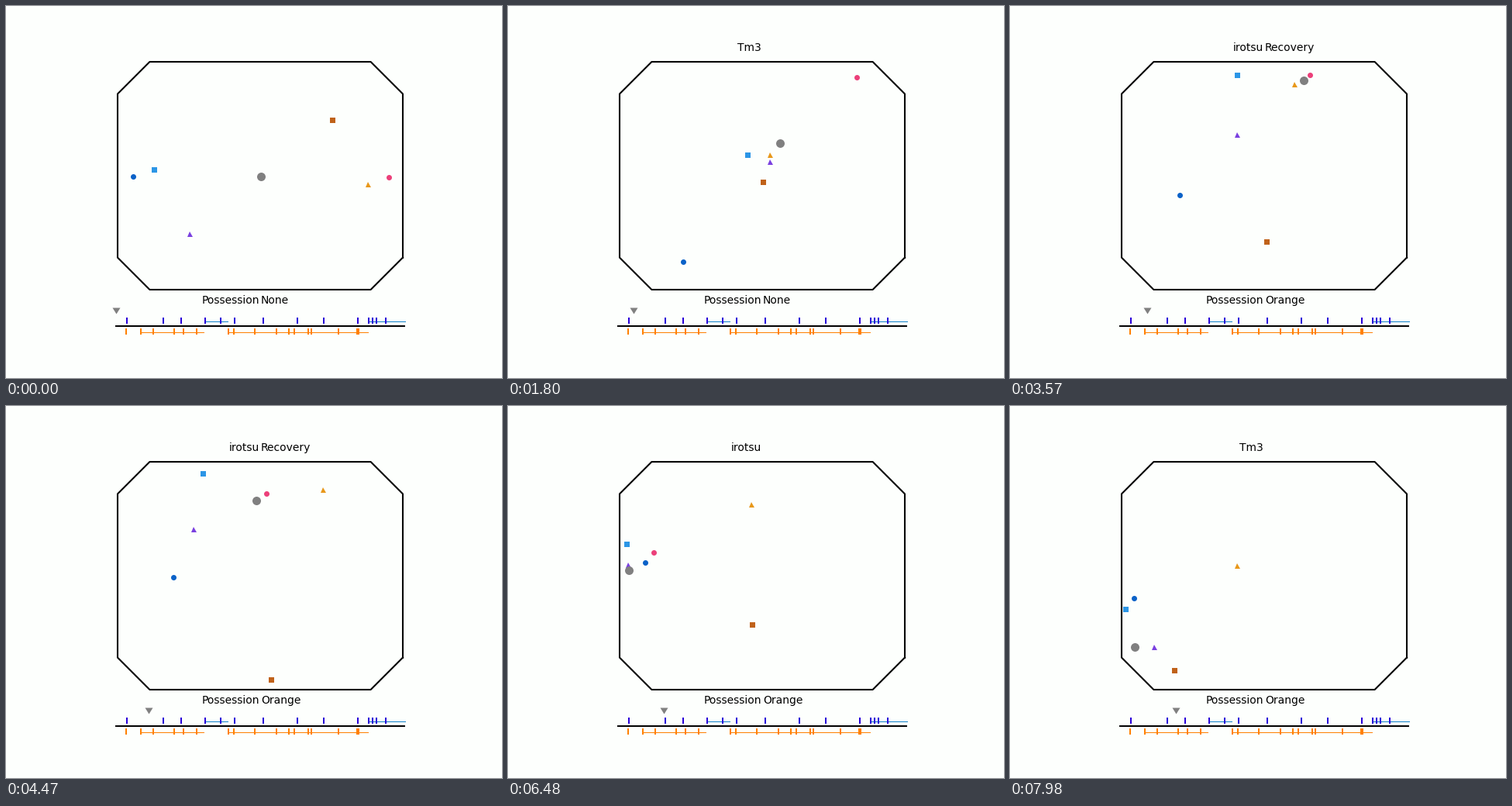
A matplotlib script that plays this animation: 640x480 px, repeating every 8000 ms.

```python
import numpy as np
import matplotlib.pyplot as plt
from matplotlib.animation import FuncAnimation

W, H, DPI = 640, 480, 100
LOOP, INTERVAL, STEP = 8000, 20, 30
PT = 72 / DPI  # points per pixel

plt.rcParams["font.family"] = "DejaVu Sans"
fig = plt.figure(figsize=(W / DPI, H / DPI), dpi=DPI, facecolor="#fdfffd")
ax = fig.add_axes([0, 0, 1, 1])
ax.set_xlim(0, W)
ax.set_ylim(H, 0)
ax.axis("off")


def line(xs, ys, color, width):
    ax.plot(xs, ys, color=color, lw=width * PT)


def label(x, y, text, align):
    return ax.text(x, y, text, fontsize=10, ha=align, va="baseline")


def dot(marker, size, color, z=6):
    return ax.plot([], [], marker=marker, ms=size * PT, mew=0, color=color,
                   ls="none", zorder=z)[0]


def team_row(y, touches, spans, tick_color, span_color):
    for a, b in spans:
        line([a, b], [y + 0.5] * 2, span_color, 1)
    ax.plot(touches, [y] * len(touches), "|", color=tick_color,
            ms=8 * PT, mew=2 * PT)


# Arena: a box with cut corners, mirrored from one corner
cx, cy, hw, hh, cut = 328, 219, 184, 147, 41.4
corner = [(hw, hh - cut), (hw - cut, hh)]
outline = [(cx + sx * x, cy + sy * y)
           for sx, sy in ((1, 1), (-1, 1), (-1, -1), (1, -1))
           for x, y in corner[::sx * sy]]
line(*zip(*outline, outline[0]), "black", 2.08)

# Timeline
team_row(406, [156, 203, 226, 257, 277, 295, 332, 376, 410, 454, 468, 473,
               478, 490], [(257, 286), (468, 515)], "#2800d8", "#1080c8")
team_row(420, [155, 174, 190, 217, 229, 246, 287, 294, 321, 349, 365, 372,
               390, 394, 429, 453, 455], [(174, 255), (287, 467)],
         "#ff8000", "#ff8000")
line([142, 514], [413, 413], "black", 2)
cursor = dot([(-5, 4), (5, 4), (0, -4)], 10, "#808080")

# Text
label(327, 384, "Possession", "right")
team = label(329, 384, "None", "left")
player = label(327, 58, "", "right")
action = label(329, 58, "", "left")

# Both teams mirror each other at kickoff, then each car has its own route.
BEATS = np.array([0, 1650, 2400, 3300, 5070, 6330, 7080, 8580])
KICKOFF = [[(163.5, 219.5), (182, 300)],
           [(190.5, 210.5), (265, 205)],
           [(236.5, 293.5), (321, 224)]]
ROUTES = {
    "navy": [(225.5, 329.5), (220.5, 274.5), (215.5, 220.5), (197.5, 208.5),
             (176.5, 201.5), (159.5, 247.5)],
    "sky": [(308.5, 191.5), (318.5, 110.5), (253.5, 86.5), (164.5, 129.5),
            (152.5, 177.5), (148.5, 261.5)],
    "violet": [(337.5, 201), (331.5, 178), (241.5, 159), (147.5, 173),
               (154.5, 204.5), (185.5, 310.5)],
    "pink": [(449.5, 91.5), (429.5, 75.5), (335.5, 112.5), (246.5, 158.5),
             (187.5, 188.5), (100, 245)],
    "gold": [(337.5, 192), (321, 111), (408.5, 107.5), (354.5, 128),
             (313.5, 127), (292.5, 206)],
    "brown": [(328.5, 226.5), (324.5, 243.5), (341.5, 352.5), (362.5, 292.5),
              (314.5, 281.5), (211.5, 340.5)],
}
kickoff = np.array(KICKOFF)
starts = np.concatenate([kickoff, (657, 440) - kickoff])
paths = np.concatenate([starts, np.array(list(ROUTES.values()))], axis=1)

# Speeds at the beats: at rest first, then the mean slope around each beat
speeds = np.zeros_like(paths)
speeds[:, 1:-1] = ((paths[:, 2:] - paths[:, :-2])
                   / (BEATS[2:] - BEATS[:-2])[:, None])
speeds[:, -1] = (paths[:, -1] - paths[:, -2]) / (BEATS[-1] - BEATS[-2])


def car_positions(s):
    """Cubic Hermite position of every car at clock s."""
    i = min(np.searchsorted(BEATS, s, "right") - 1, len(BEATS) - 2)
    h = BEATS[i + 1] - BEATS[i]
    u = (s - BEATS[i]) / h
    ease = u * u * (3 - 2 * u)
    return (paths[:, i] * (1 - ease) + paths[:, i + 1] * ease
            + h * u * (1 - u) * (speeds[:, i] * (1 - u)
                                 - speeds[:, i + 1] * u))


cars = [dot("o", 7, "#0a62c8", 7), dot("s", 7, "#2c96e6", 7),
        dot("^", 7, "#7a40e0", 7), dot("o", 7, "#ec407a"),
        dot("^", 7, "#e8981a"), dot("s", 7, "#c0621a")]
pink = cars[3]
PINK_OUT = 7650
ball = dot("o", 11, "#808080", 8)

# The ball rolls straight from touch to touch: (clock, player, action, x, y)
TOUCHES = [(0, "", "", 328.5, 219.5),
           (1710, "Tm3", "", 328.5, 219.5),
           (3870, "irotsu", "Recovery", 397.5, 87),
           (5770, "irotsu", "", 279.5, 142.5),
           (7270, "Tm3", "", 138, 222.5),
           (8580, "Tm3", "", 160.5, 310.5)]
touch_time, names, actions, ball_x, ball_y = zip(*TOUCHES)
TURNOVER = touch_time[2]


def place(artist, x, y):
    artist.set_data([x], [y])


def draw(i):
    t = (i * INTERVAL + INTERVAL // 2) // STEP * STEP
    s = t + 600 if t else 0  # the clock skips ahead at kickoff
    for car, (x, y) in zip(cars, car_positions(s)):
        place(car, x, y)
    pink.set_visible(s < PINK_OUT)
    place(ball, np.interp(s, touch_time, ball_x),
          np.interp(s, touch_time, ball_y))
    place(cursor, 141.6 + 0.0084 * s, 393)
    last = np.searchsorted(touch_time, s, "right") - 1
    player.set_text(names[last])
    action.set_text(actions[last])
    team.set_text("Orange" if s >= TURNOVER else "None")
    return []


anim = FuncAnimation(fig, draw, frames=LOOP // INTERVAL, interval=INTERVAL,
                     init_func=lambda: draw(0), repeat=True, repeat_delay=0)
plt.show()
```
